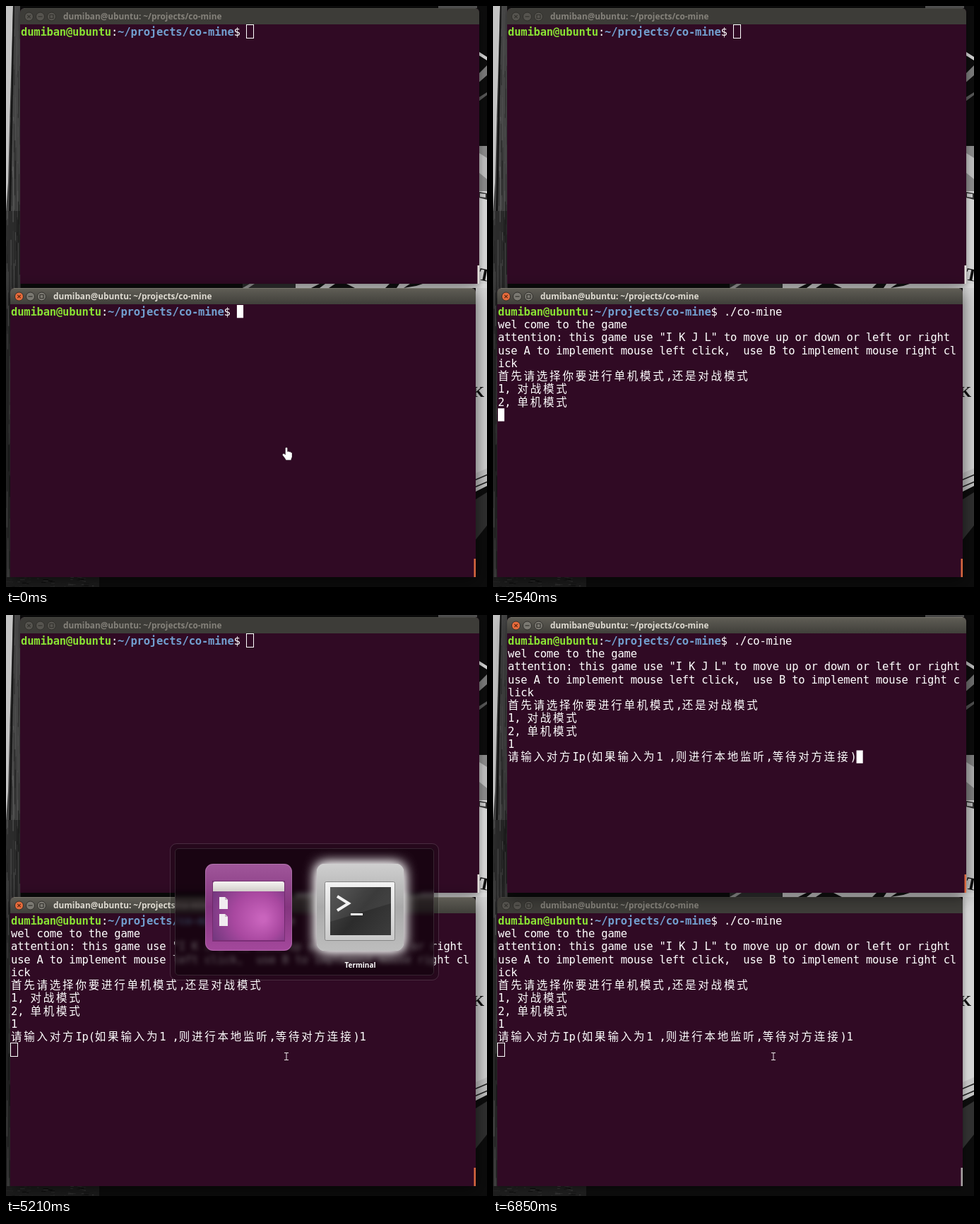
Animation of 681 by 822 pixels, one loop 8 s. Source, as an HTML page with a canvas:

```html
<!DOCTYPE html>
<html lang="zh-CN">
<head>
<meta charset="utf-8">
<title>Two terminals</title>
<style>
html, body { margin: 0; width: 100%; height: 100%; overflow: hidden; background: #000; }
canvas { display: block; }
</style>
</head>
<body>
<canvas id="stage" width="681" height="822"></canvas>
<script>
const W = 681, H = 822, LOOP = 8000;
const CELL = 9.14, ROW = 18.28;
const canvas = document.getElementById('stage');
const ctx = canvas.getContext('2d');

const USER = 'dumiban@ubuntu', DIR = '~/projects/co-mine';
const MONO = '15.5px "DejaVu Sans Mono", monospace';
const CJK = '15.5px "Noto Sans CJK SC", "Noto Sans CJK", sans-serif';
const MENU = `./co-mine
wel come to the game
attention: this game use "I K J L" to move up or down or left or right
use A to implement mouse left click,  use B to implement mouse right click
首先请选择你要进行单机模式,还是对战模式
1, 对战模式
2, 单机模式
`;
const ASK = MENU + '1\n请输入对方Ip(如果输入为1 ,则进行本地监听,等待对方连接)';

// Each timeline is a list of [start in ms, value]
const upper = {
  x: 20, y: 3, w: 650, h: 390, cols: 70, idleBar: '#e4e0dc',
  text: [[0, ''], [5980, './co-mine '], [6210, MENU], [6760, MENU + '1'], [6850, ASK]]
};
const lower = {
  x: 6, y: 399, w: 659, h: 409, cols: 71, idleBar: '#aaa5a5',
  text: [[0, ''], [1990, './co-mine '], [2070, './co-mine  '], [2540, MENU],
    [3700, MENU + '1'], [3870, ASK], [4110, ASK + '1'], [4260, ASK + '1\n']]
};
const pointer = [[0, 'hand'], [1140, 'spin0'], [1220, 'spin1'], [1370, 'spin2'],
  [1520, 'beam'], [1990, ''], [4890, 'beam'], [5050, 'arrow'], [5210, 'beam']];
const SWITCH = 5210, FOCUS = 5360;

const at = (steps, t) => steps.filter(s => s[0] <= t).pop()[1];

function rect(c, color, x, y, w, h) {
  c.fillStyle = color;
  c.fillRect(x, y, w, h);
}

function round(x, y, w, h, r, fill, stroke) {
  ctx.beginPath();
  ctx.roundRect(x, y, w, h, r);
  if (fill) { ctx.fillStyle = fill; ctx.fill(); }
  if (stroke) { ctx.strokeStyle = stroke; ctx.stroke(); }
}

function poly(c, points, fill, stroke) {
  c.beginPath();
  points.forEach(([x, y]) => c.lineTo(x, y));
  c.closePath();
  if (fill) { c.fillStyle = fill; c.fill(); }
  if (stroke) { c.strokeStyle = stroke; c.stroke(); }
}

function gradient(x0, y0, x1, y1, ...colors) {
  const g = ctx.createLinearGradient(x0, y0, x1, y1);
  colors.forEach((c, i) => g.addColorStop(i / (colors.length - 1), c));
  return g;
}

function makeWallpaper() {
  const off = document.createElement('canvas');
  off.width = W; off.height = H;
  const c = off.getContext('2d');
  let seed = 7;
  const rnd = () => (seed = seed * 16807 % 2147483647) / 2147483647;

  rect(c, '#0c0c0c', 0, 0, W, H);
  // weathered planks
  rect(c, '#484848', 0, 0, 20, 290);
  rect(c, '#2b2b2b', 0, 290, 20, 532);
  for (let i = 0; i < 190; i++) {
    const v = 15 + rnd() * 100 | 0;
    rect(c, `rgba(${v},${v},${v},.6)`, rnd() * 20, rnd() * H, .6 + rnd(), 20 + rnd() * 70);
  }
  poly(c, [[0, 0], [10, 0], [5, 170], [3, 250], [0, 290]], '#c4c4c4');
  poly(c, [[10, 0], [12, 0], [7, 290], [4, 290]], '#161616');
  rect(c, '#1d1d1d', 0, 808, 132, 14);
  for (let i = 0; i < 60; i++) {
    const v = 10 + rnd() * 50 | 0;
    rect(c, `rgb(${v},${v},${v})`, rnd() * 125, 808 + rnd() * 14, 1 + rnd() * 7, 1);
  }
  rect(c, '#555', 612, 0, 55, 3);

  // clock rim and face
  poly(c, [[665, 62], [681, 72], [681, 77], [665, 67]], '#ccc');
  poly(c, [[665, 100], [681, 84], [681, 98], [665, 112]], '#777');
  poly(c, [[665, 132], [681, 122], [681, 126], [665, 138]], '#555');
  rect(c, '#888', 665, 198, 16, 64);
  poly(c, [[665, 205], [681, 215], [681, 245], [665, 232]], '#bbb');
  rect(c, '#d4d4d4', 665, 262, 16, 400);
  poly(c, [[665, 262], [681, 265], [681, 274], [665, 270]], '#333');
  poly(c, [[671, 265], [679, 266], [679, 271], [671, 270]], '#c8c8c8');
  poly(c, [[665, 661], [681, 654], [681, 679], [665, 687]], '#c4c4c4');
  c.lineWidth = 1.5;
  poly(c, [[663, 671], [682, 663], [682, 673], [663, 681]], null, '#222');
  poly(c, [[665, 698], [681, 688], [681, 735], [665, 755]], '#303030');

  // strip between the windows
  rect(c, '#333', 335, 393, 75, 6);
  poly(c, [[335, 399], [345, 393], [352, 393], [343, 399]], '#aaa');
  rect(c, '#dcdcdc', 410, 393, 271, 6);
  poly(c, [[432, 399], [444, 393], [452, 393], [444, 399]], '#111');
  poly(c, [[457, 399], [466, 393], [482, 393], [494, 399]], '#111');
  poly(c, [[537, 399], [543, 393], [557, 393], [553, 399]], '#111');
  poly(c, [[563, 399], [572, 393], [590, 393], [581, 396]], '#111');

  c.fillStyle = '#111';
  c.font = 'bold 25px "Liberation Serif", serif';
  c.save();
  c.translate(668, 387);
  c.rotate(.2);
  c.fillText('T', 0, 0);
  c.restore();
  c.font = 'bold 22px "Liberation Serif", serif';
  c.fillText('K', 660, 553);
  return off;
}

function drawButtons(win, active) {
  const y = win.y + 12;
  for (let i = 0; i < 3; i++) {
    const x = win.x + 12.5 + i * 16;
    ctx.beginPath();
    ctx.arc(x, y, 6, 0, 7);
    ctx.fillStyle = !active ? '#56544f' : i ? '#7b7972' : '#e66b3c';
    ctx.fill();
    ctx.lineWidth = 1;
    ctx.strokeStyle = '#302f2b';
    ctx.stroke();
    ctx.lineWidth = 1.2;
    ctx.strokeStyle = active && !i ? '#59260f' : '#33322e';
    ctx.beginPath();
    if (i == 0) {
      ctx.moveTo(x - 2.2, y - 2.2); ctx.lineTo(x + 2.2, y + 2.2);
      ctx.moveTo(x + 2.2, y - 2.2); ctx.lineTo(x - 2.2, y + 2.2);
    } else if (i == 1) {
      ctx.moveTo(x - 3, y); ctx.lineTo(x + 3, y);
    } else {
      ctx.rect(x - 2.5, y - 2.5, 5, 5);
    }
    ctx.stroke();
  }
}

// Writes on the cell grid; returns the position after the last glyph
function write(win, str, color, weight, pos) {
  let { col, row } = pos;
  ctx.fillStyle = color;
  for (const ch of str) {
    const wide = ch > '\u2e80' ? 2 : 1;
    if (ch == '\n' || col + wide > win.cols) { col = 0; row++; }
    if (ch == '\n') continue;
    ctx.font = wide > 1 ? CJK : weight + ' ' + MONO;
    ctx.fillText(ch, win.x + 1 + col * CELL, win.y + 24 + row * ROW + 14.7);
    col += wide;
  }
  return { col, row };
}

function drawWindow(win, active, solid, t) {
  const { x, y, w, h } = win;
  ctx.save();
  ctx.shadowColor = active ? 'rgba(0,0,0,.6)' : 'rgba(0,0,0,.4)';
  ctx.shadowBlur = active ? 22 : 8;
  ctx.shadowOffsetY = active ? 4 : 2;
  round(x, y, w, h, [6, 6, 0, 0], '#300a24');
  ctx.restore();

  round(x, y, w, 23, [6, 6, 0, 0],
    active ? gradient(0, y, 0, y + 23, '#605e56', '#403f3a') : '#3d3c38');
  rect(ctx, active ? '#77746a' : '#494843', x + 5, y, w - 10, 1);
  drawButtons(win, active);
  ctx.font = 'bold 11.8px "Open Sans", sans-serif';
  ctx.fillStyle = active ? '#dfdbd2' : '#85827b';
  ctx.fillText(`${USER}: ${DIR}`, x + 61, y + 16);

  let pos = write(win, USER, '#8ae234', 'bold', { col: 0, row: 0 });
  pos = write(win, ':', '#fff', '', pos);
  pos = write(win, DIR, '#729fcf', 'bold', pos);
  pos = write(win, '$ ' + at(win.text, t), '#fff', '', pos);

  const cx = x + 1 + pos.col * CELL;
  const cy = y + 24 + pos.row * ROW;
  if (solid) {
    rect(ctx, '#fff', cx, cy, CELL, ROW);
  } else {
    ctx.strokeStyle = '#fff';
    ctx.lineWidth = 1;
    ctx.strokeRect(Math.round(cx) - .5, Math.round(cy) - .5, 10, 19);
  }
  rect(ctx, active ? '#d9683f' : win.idleBar, x + w - 2.5, y + h - 26, 2.5, 26);
}

function drawSwitcher() {
  ctx.lineWidth = 1;
  round(232.5, 323.5, 380, 193, 9, 'rgba(0,0,0,.22)', 'rgba(255,255,255,.14)');
  ctx.save();
  ctx.beginPath();
  ctx.roundRect(239, 330, 367, 180, 5);
  ctx.clip();
  ctx.filter = 'blur(3px)';
  ctx.drawImage(canvas, 0, 0);
  ctx.filter = 'none';
  rect(ctx, 'rgba(12,0,9,.5)', 239, 330, 367, 180);
  ctx.restore();
  round(239.5, 330.5, 366, 179, 5, null, 'rgba(255,255,255,.13)');

  // desktop tile
  round(282, 352, 123, 123, 11, gradient(0, 352, 0, 475, '#a0569a', '#84357f', '#a4489c'));
  round(282.5, 352.5, 122, 122, 11, null, 'rgba(255,255,255,.18)');
  rect(ctx, 'rgba(60,10,60,.35)', 292, 376, 103, 86);
  const glow = ctx.createRadialGradient(364, 430, 4, 350, 425, 65);
  glow.addColorStop(0, '#c964bd');
  glow.addColorStop(.5, '#a948a0');
  glow.addColorStop(1, '#74387f');
  rect(ctx, glow, 293, 390, 101, 70);
  round(293, 377, 101, 14, [3, 3, 0, 0], gradient(0, 377, 0, 391, '#f6f4f2', '#d2cdca'));
  for (const y of [399, 423]) {
    poly(ctx, [[302, y], [310, y], [314, y + 4], [314, y + 17], [302, y + 17]], '#f1edf0');
    poly(ctx, [[310, y], [310, y + 4], [314, y + 4]], '#c7b8c5');
  }

  // selected terminal tile
  ctx.save();
  ctx.shadowColor = '#fff';
  ctx.shadowBlur = 18;
  round(440, 352, 123, 123, 11, '#c4c4c4');
  round(440, 352, 123, 123, 11, gradient(0, 352, 0, 475, '#cfcfcf', '#aaa', '#bdbdbd'));
  ctx.restore();
  round(451.5, 377.5, 99, 83, 2, gradient(0, 377, 0, 461, '#f3f3f3', '#c9c9c9'), '#858585');
  rect(ctx, gradient(459, 385, 545, 453, '#4c4c4c', '#2c2c2c', '#3d3d3d'), 459, 385, 86, 68);
  poly(ctx, [[459, 385], [545, 385], [545, 408], [459, 434]], 'rgba(255,255,255,.07)');
  ctx.lineWidth = 4;
  ctx.strokeStyle = '#f2f2f2';
  ctx.beginPath();
  ctx.moveTo(469, 398); ctx.lineTo(485, 408); ctx.lineTo(469, 418);
  ctx.stroke();
  rect(ctx, '#f2f2f2', 488, 422, 17, 3);

  ctx.fillStyle = '#fff';
  ctx.font = 'bold 10px "Open Sans", sans-serif';
  ctx.textAlign = 'center';
  ctx.fillText('Terminal', 501.5, 498.5);
  ctx.textAlign = 'left';
}

function drawPointer(kind) {
  ctx.lineWidth = 1;
  if (kind == 'hand') {
    const p = new Path2D('M395.5 625.5Q397 623.5 398.5 625.5V630.5Q400.5 629.5 401 631Q402.5 630 403 631.5' +
      'Q405 631 405 633V638Q404 640 403.5 642.5H396.5Q395 639.5 391.5 635.5Q391.5 632.5 394 633.5L395.5 635Z');
    ctx.fillStyle = '#fff';
    ctx.fill(p);
    ctx.strokeStyle = 'rgba(0,0,0,.5)';
    ctx.lineWidth = .6;
    ctx.stroke(p);
  } else if (kind == 'arrow') {
    poly(ctx, [[395.5, 623.5], [395.5, 635], [398.2, 632.6], [400.2, 637.3], [402.2, 636.4],
      [400.2, 632], [403.8, 632]], '#fff', '#111');
  } else if (kind == 'beam') {
    ctx.strokeStyle = '#e8e4e6';
    ctx.beginPath();
    ctx.moveTo(394, 619.5); ctx.lineTo(400, 619.5);
    ctx.moveTo(397, 619.5); ctx.lineTo(397, 629.5);
    ctx.moveTo(394, 629.5); ctx.lineTo(400, 629.5);
    ctx.stroke();
  } else if (kind) {
    const a = kind.slice(4) * 1.6;
    ctx.lineWidth = 4;
    ctx.strokeStyle = '#77717a';
    ctx.beginPath();
    ctx.arc(395.5, 623.5, 10, 0, 7);
    ctx.stroke();
    ctx.strokeStyle = '#fff';
    ctx.beginPath();
    ctx.arc(395.5, 623.5, 10, a, a + 2);
    ctx.stroke();
  }
}

const wallpaper = makeWallpaper();

function draw(t) {
  ctx.drawImage(wallpaper, 0, 0);
  const swapped = t >= FOCUS;
  const [back, front] = swapped ? [lower, upper] : [upper, lower];
  drawWindow(back, false, false, t);
  drawWindow(front, true, swapped || t < SWITCH, t);
  if (t >= SWITCH && !swapped) drawSwitcher();
  drawPointer(at(pointer, t));
}

const start = performance.now();
function tick() {
  draw((performance.now() - start) % LOOP);
  requestAnimationFrame(tick);
}
tick();
</script>
</body>
</html>
```
